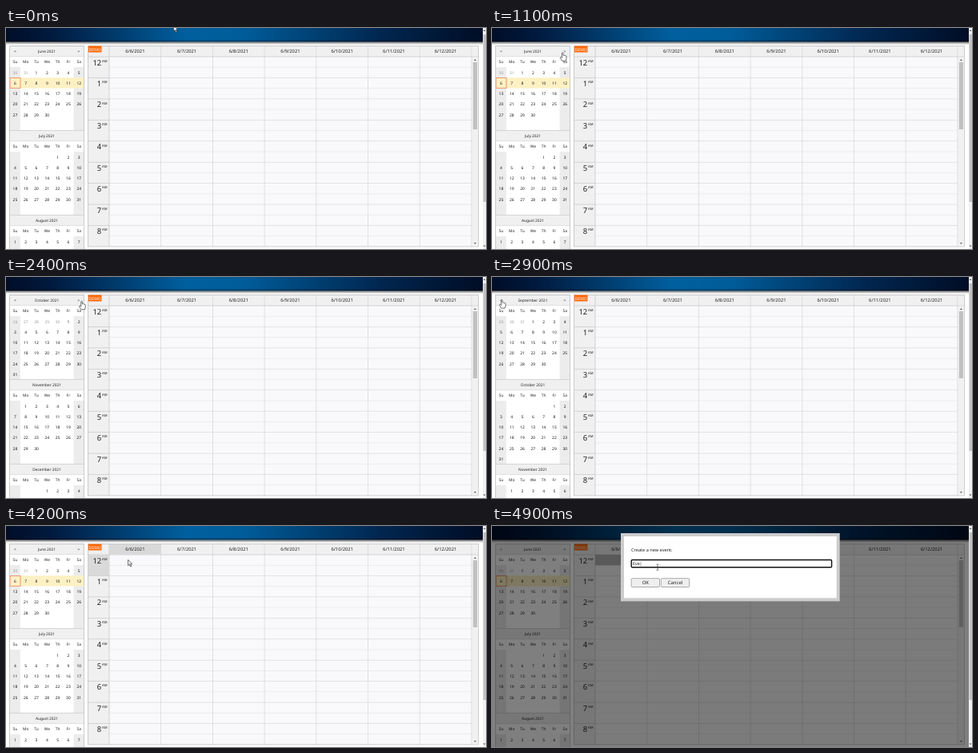
An HTML page that plays this animation: 600 px wide and 277 px high, repeating every 5 s.

```html
<!DOCTYPE html>
<html lang="en">
<head>
<meta charset="utf-8">
<title>Event calendar</title>
<style>
html, body { margin: 0; width: 100%; height: 100%; overflow: hidden; background: #fff; }
svg { display: block; width: 100%; height: 100%; }
text { font-family: "Noto Sans", "Open Sans", sans-serif; fill: #222; text-rendering: geometricPrecision; }
</style>
</head>
<body>
<svg id="stage" viewBox="0 0 600 277">
  <defs>
    <linearGradient id="sky">
      <stop offset="0" stop-color="#000d27"/>
      <stop offset=".1" stop-color="#011b40"/>
      <stop offset=".38" stop-color="#00609f"/>
      <stop offset=".5" stop-color="#005c99"/>
      <stop offset=".78" stop-color="#012751"/>
      <stop offset="1" stop-color="#000d25"/>
    </linearGradient>
    <linearGradient id="shade" x2="0" y2="1">
      <stop offset="0" stop-color="#000" stop-opacity=".6"/>
      <stop offset="1" stop-color="#000" stop-opacity="0"/>
    </linearGradient>
  </defs>
  <g id="page"></g>
  <g id="hover"></g>
  <g id="labels"></g>
  <g id="months"></g>
  <g id="modal"></g>
  <g id="scroll"></g>
  <g id="arrow"><path d="M0 0V7.2L1.7 5.7 2.9 8.6 4.1 8.1 2.9 5.3H5.1Z" fill="#fff" stroke="#222" stroke-width=".65"/></g>
  <g id="hand"><path d="M-.8 6.2V.8Q0-.5.8.8V3.8L1.5 3.4 2.2 4.1 3 3.8 3.6 4.5Q4.7 4.2 4.7 5.3V8L3.8 10.8H-.7L-3 7.2Q-3.1 5.7-1.8 6.1L-.8 7Z" fill="#fff" stroke="#222" stroke-width=".65"/></g>
  <g id="beam"><path d="M-1.5-3.5H-.4L0-3.2.4-3.5H1.5M0-3.2V3.2M-1.5 3.5H-.4L0 3.2.4 3.5H1.5" fill="none" stroke="#333" stroke-width=".65"/></g>
</svg>
<script>
const $ = id => document.getElementById(id);
const rect = (x, y, w, h, fill, extra = '') =>
  `<rect x="${x}" y="${y}" width="${w}" height="${h}" fill="${fill}" ${extra}/>`;
const text = (s, x, y, size, extra = 'text-anchor="middle"') =>
  `<text x="${x}" y="${y}" font-size="${size}" ${extra}>${s}</text>`;
const hLine = (x, y, w, color) => rect(x, y - .35, w, .7, color);
const vLine = (x, y, h, color) => rect(x - .35, y, .7, h, color);
const triangle = (x, y, d) => `<path d="M${x - 1.5} ${y + d}h3l-1.5 ${-2 * d}z" fill="#666"/>`;

const TOP = 36, HALF = 13.22, LEFT = 129, COL = 64.7;

function drawPage() {
  let out = rect(0, 17, 596, 4, 'url(#shade)') + rect(0, 0, 596, 17.3, 'url(#sky)')
    + rect(0, 15, 596, 2.3, '#000', 'opacity=".25"');
  out += rect(102.5, 22.5, 488, 251.5, '#f0f0f1') + rect(LEFT, TOP, 453, 238, '#f9f8fa');
  for (let i = 1; i < 18; i++) {
    out += hLine(LEFT, TOP + i * HALF, 453, i % 2 ? '#e7e6e8' : '#dad9db');
    if (i % 2 === 0) out += hLine(102.5, TOP + i * HALF, 26.5, '#c8c8c8');
  }
  for (let i = 0; i < 8; i++) out += vLine(LEFT + i * COL, 22.5, 251.5, i ? '#d6d5d8' : '#c4c4c4');
  out += hLine(102.5, TOP, 488, '#c4c4c4')
    + rect(102.5, 22.5, 488, 251.5, 'none', 'stroke="#c0c0c0" stroke-width=".8"');
  out += rect(582.8, 36.5, 7.3, 237, '#f1f1f1') + rect(583.8, 43, 5.2, 84, '#c1c1c1')
    + triangle(586.4, 40, 1) + triangle(586.4, 270, -1);
  $('page').innerHTML = out;

  let labels = rect(103, 22.5, 16.5, 8, '#ff6a0a') + text('DEMO', 111.2, 28.6, 5.1, 'text-anchor="middle" style="fill:#fff"');
  for (let i = 0; i < 7; i++) labels += text(`6/${6 + i}/2021`, LEFT + (i + .5) * COL, 31.3, 5.8);
  for (let i = 0; i < 9; i++) {
    const y = TOP + 2 * HALF * i;
    labels += text(i || 12, 119.3, y + 10.6, 9.5, 'text-anchor="end"') + text('AM', 120, y + 6.8, 4.2, '');
  }
  $('labels').innerHTML = labels;
  $('scroll').innerHTML = rect(596, 0, 4, 277, '#f1f1f1') + rect(596.5, 8, 3.5, 210, '#c1c1c1')
    + triangle(598, 3, 1) + triangle(598, 273.5, -1);
}

const NAMES = ['June', 'July', 'August', 'September', 'October', 'November', 'December'];
const CELL = 13.3, ROW = 13.25;

function drawMonths(first) {
  let out = rect(4.5, 22.5, 93, 260, '#fff');
  for (let n = 0; n < 3; n++) {
    const top = 22.5 + n * 8 * ROW, month = 5 + first + n;
    const lead = new Date(Date.UTC(2021, month, 1)).getUTCDay();
    const count = new Date(Date.UTC(2021, month + 1, 0)).getUTCDate();
    const before = new Date(Date.UTC(2021, month, 0)).getUTCDate();
    const put = (s, col, row, extra) => text(s, 11.4 + col * CELL, (top + row * ROW + 8.5).toFixed(2), 4.9, extra);
    out += rect(4.5, top, 93, ROW, '#f0f0f1') + hLine(4.5, top, 93, '#c8c8c8') + hLine(4.5, top + ROW, 93, '#d8d8d8');
    out += rect(4.5, top + 2 * ROW, CELL, 6 * ROW, '#ececed') + rect(84.6, top + 2 * ROW, 12.9, 6 * ROW, '#ececed');
    if (month === 5)
      out += rect(4.5, top + 3 * ROW, 93, ROW, '#fdf1c4')
        + rect(5, top + 3 * ROW + .2, 13, ROW - .4, 'none', 'stroke="#f08a62" stroke-width=".9"');
    out += text(`${NAMES[month - 5]} 2021`, 51, top + 8.4, 4.8);
    if (!n) out += put('&lt;', 0, 0) + put('&gt;', 5.98, 0);
    ['Su', 'Mo', 'Tu', 'We', 'Th', 'Fr', 'Sa'].forEach((d, i) => out += put(d, i, 1));
    for (let i = n ? lead : 0; i < lead + count; i++) {
      const day = i - lead + 1, gray = day < 1;
      out += put(gray ? before + day : day, i % 7, 2 + Math.floor(i / 7),
        `text-anchor="middle" style="fill:${gray ? '#999' : '#111'}"`);
    }
  }
  $('months').innerHTML = out + rect(4.5, 22.5, 93, 260, 'none', 'stroke="#c0c0c0" stroke-width=".8"');
}

function drawModal() {
  const button = (s, x) => rect(x, 65.7, 35.3, 10.8, '#efefef', 'rx="1" stroke="#777" stroke-width=".6"')
    + text(s, x + 17.7, 73.2, 6);
  $('modal').innerHTML = rect(0, 0, 596, 277, '#000', 'opacity=".5"')
    + rect(161, 9, 273.7, 85.3, '#ccc') + rect(165, 13, 265.7, 77.3, '#fff')
    + text('Create a new event:', 174, 32, 5.6, '')
    + rect(174.2, 42.5, 250.4, 9.2, '#fff', 'rx="1.2" stroke="#111" stroke-width="1.4"')
    + text('<tspan id="typed"></tspan><tspan id="caret" dx="-.4">|</tspan>', 176, 49.1, 5.4, '')
    + button('OK', 174.2) + button('Cancel', 211.3);
}

// time, x, y and pointer shape
const PATH = [
  [0, 209.5, -3.2, 'arrow'], [100, 204, 18], [200, 188, 58], [300, 160, 93], [400, 126, 82], [600, 104, 45],
  [800, 51, 33], [1000, 80, 31, 'hand'], [1100, 88.3, 30.5], [1200, 88.3, 35.5],
  [1500, 50, 152], [1800, 88, 36], [2000, 94.6, 30], [2400, 94.6, 30],
  [2500, 75, 32, 'arrow'], [2600, 35, 31], [2700, 12.3, 28.3, 'hand'], [3600, 12.3, 28.3],
  [3700, 30, 45], [3800, 70, 70], [3900, 110, 81, 'arrow'], [4000, 140, 74], [4200, 152.6, 42.3], [4300, 152.6, 42.3],
  [4500, 188, 49, 'beam'], [4600, 207, 51.7], [5000, 207, 51.7]
];

function pointer(t) {
  const i = PATH.findIndex(p => p[0] > t) - 1, a = PATH[i], b = PATH[i + 1];
  const k = (t - a[0]) / (b[0] - a[0]);
  const shape = PATH.slice(0, i + 1).filter(p => p[3]).pop()[3];
  return { x: a[1] + (b[1] - a[1]) * k, y: a[2] + (b[2] - a[2]) * k, shape };
}

function drawHover(t, x, y) {
  let out = '';
  if (t >= 4300) out += rect(LEFT, TOP, COL, HALF, '#b4b4b4');
  if (t <= 4300 && x > LEFT && y > TOP) {
    const col = Math.floor((x - LEFT) / COL), row = Math.floor((y - TOP) / HALF / 2);
    out += rect(LEFT + col * COL, 22.9, COL, 12.8, '#d9d9d9')
      + rect(102.9, TOP + row * HALF * 2 + .3, 25.8, HALF * 2 - .6, '#d9d9d9');
  }
  $('hover').innerHTML = out;
}

const NEXT = [2100, 2200, 2300, 2400], BACK = [2900, 3100, 3300, 3400];
const passed = (times, t) => times.filter(v => v <= t).length;
let lastTime = -1, lastMonth = -1;

function render(t) {
  const month = passed(NEXT, t) - passed(BACK, t);
  if (month !== lastMonth) drawMonths(lastMonth = month);
  const p = pointer(t);
  drawHover(t, p.x, p.y);
  for (const shape of ['arrow', 'hand', 'beam']) {
    $(shape).style.display = shape === p.shape ? '' : 'none';
    $(shape).setAttribute('transform', `translate(${p.x} ${p.y})`);
  }
  $('modal').style.display = t >= 4300 ? '' : 'none';
  $('typed').textContent = 'Event'.slice(0, 5 - passed([4800, 4900], t));
}

drawPage();
drawModal();
const start = performance.now();
function tick() {
  const t = Math.floor((performance.now() - start) % 5000 / 100) * 100;
  if (t !== lastTime) render(lastTime = t);
  requestAnimationFrame(tick);
}
tick();
</script>
</body>
</html>
```
